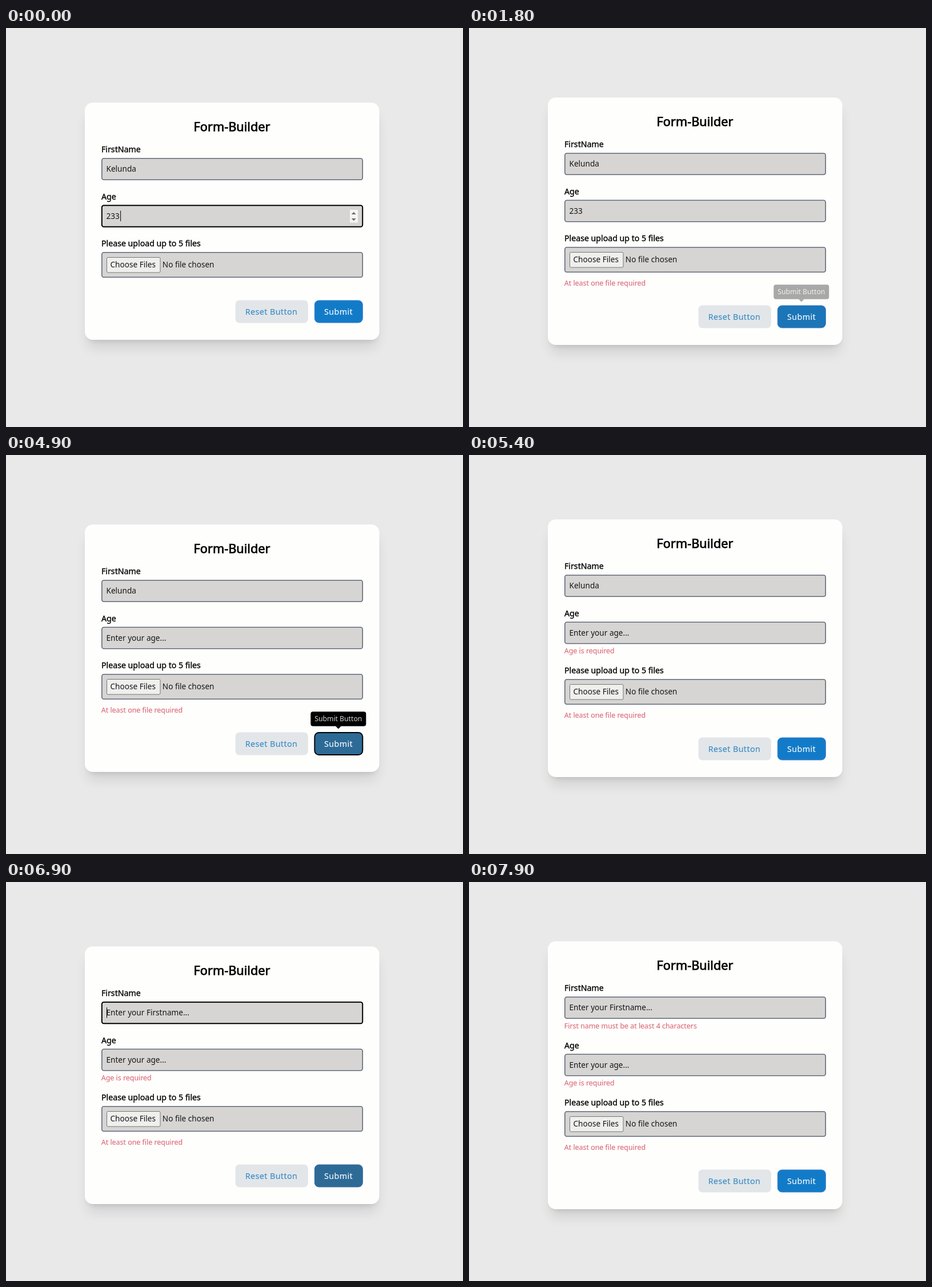
An HTML page for the animation above (8000 ms loop, 800 by 700 pixels).

```html
<!DOCTYPE html>
<html lang="en">
<head>
<meta charset="utf-8">
<title>Form-Builder</title>
<style>
  html, body { margin: 0; width: 100%; height: 100%; overflow: hidden; background: #e9e9e9; }
  svg { display: block; width: 800px; height: 700px; font-family: "Noto Sans", "Open Sans", sans-serif; }
  text { font-size: 13.6px; fill: #161616; white-space: pre; }
  .title { font-size: 21.7px; fill: #000; stroke: #000; stroke-width: .75; text-anchor: middle; }
  .label { font-size: 14.17px; fill: #000; stroke: #000; stroke-width: .35; }
  .error { font-size: 12.4px; fill: #dc6d7b; stroke: #dc6d7b; stroke-width: .15; }
  .btn { font-size: 14.3px; letter-spacing: .4px; stroke-width: .2; }
  .tip text { font-size: 12.2px; fill: #d4d4d4; text-anchor: middle; }
  .field { fill: #d6d5d3; }
</style>
</head>
<body>
<svg id="stage" viewBox="0 0 800 700"></svg>
<script>
const LOOP = 8000, STEP = 100, ERROR_H = 18;
const NAME = 'Kelunda';
const stage = document.getElementById('stage');

function el(parent, tag, attrs = {}, content = '') {
  const node = document.createElementNS('http://www.w3.org/2000/svg', tag);
  set(node, attrs);
  node.textContent = content;
  return parent.appendChild(node);
}
function set(node, attrs) {
  for (const key in attrs) node.setAttribute(key, attrs[key]);
}
const rect = (parent, x, y, width, height, rx, attrs) =>
  el(parent, 'rect', { x, y, width, height, rx, ...attrs });
const text = (parent, x, y, cls, content) =>
  el(parent, 'text', { x, y, class: cls }, content);
const show = (node, on) => set(node, { visibility: on ? 'visible' : 'hidden' });
const between = (t, a, b) => t >= a && t < b;
const ramp = (t, a, b) => Math.min(1, Math.max(0, (t - a) / (b - a)));
const mix = (a, b, k) => `rgb(${a.map((v, i) => Math.round(v + (b[i] - v) * k))})`;

// Everything is placed relative to the top edge of the card.
const card = el(stage, 'g');
const shadowFar = rect(card, 142.5, 22.5, 507, 0, 10, { fill: '#000', opacity: .1, style: 'filter:blur(11px)' });
const shadowNear = rect(card, 143.5, 12, 505, 0, 10, { fill: '#000', opacity: .1, style: 'filter:blur(4.5px)' });
const panel = rect(card, 138, 0, 515.5, 0, 14, { fill: '#fefefd' });
text(card, 395.5, 50.3, 'title', 'Form-Builder');

function makeField(label, y, height, error, errorY) {
  const g = el(card, 'g');
  text(g, 167, y - 10, 'label', label);
  const box = rect(g, 167.8, y + .8, 456.4, height - 1.6, 3.5, { class: 'field' });
  const err = text(g, 166.8, y + errorY, 'error', error);
  return { g, box, err, y };
}

function makeInput(label, y, error) {
  const field = makeField(label, y, 39, error, 55.5);
  field.value = text(field.g, 175.5, y + 24.3, '', '');
  field.caret = rect(field.g, 0, y + 10, 1, 18.5, 0, { fill: '#000' });
  return field;
}

const first = makeInput('FirstName', 97, 'First name must be at least 4 characters');
const age = makeInput('Age', 179.5, 'Age is required');
const files = makeField('Please upload up to 5 files', 262, 45, 'At least one file required', 68);

const spinner = el(age.g, 'g');
rect(spinner, 602, 188, 14, 22.5, 0, { fill: '#f5f5f4' });
el(spinner, 'path', { d: 'M604.7 196h8l-4-4.3z M604.7 203h8l-4 4.3z', fill: '#6e6e6e' });

set(files.box, { stroke: '#626b79', 'stroke-width': 1.6 });
rect(files.g, 176.5, 271.5, 93.5, 26.5, 2, { fill: '#efefee', stroke: '#767676' });
text(files.g, 182.5, 289, '', 'Choose Files');
text(files.g, 273.8, 289, '', 'No file chosen');

const buttons = el(card, 'g');
rect(buttons, 401.5, 346.5, 127.3, 40, 7, { fill: '#e3e6e9' });
set(text(buttons, 418.8, 371.6, 'btn', 'Reset Button'), { fill: '#428fc6', style: 'fill:#428fc6;stroke:#428fc6' });
const submit = rect(buttons, 540.3, 347, 84, 39, 7.5);
set(text(buttons, 557, 371.6, 'btn', 'Submit'), { style: 'fill:#eef5fb;stroke:#eef5fb' });

function makeTip(cx, width, label) {
  const g = el(buttons, 'g', { class: 'tip' });
  rect(g, cx - width / 2, 310.3, width, 25.5, 4, { fill: '#000' });
  el(g, 'path', { d: `M${cx - 5} 335.5h10l-5 5z`, fill: '#000' });
  text(g, cx, 327, '', label);
  return g;
}
const resetTip = makeTip(465, 88, 'Reset Button');
const submitTip = makeTip(581.8, 97, 'Submit Button');

// One visit to the submit button: hover, tooltip, press, validation, leave.
const visits = [
  { hover: [1100, 1300], tip: [1100, 1400], press: 1300, done: 1500, leave: [1600, 1900] },
  { hover: [4100, 4400], tip: [4300, 4600], press: 4900, done: 5100, leave: [5100, 5400] },
  { hover: [6600, 6900], tip: [6900, 7100], press: 7200, done: 7400, leave: [7600, 7900] }
];

function drawInput(field, value, placeholder, focus, caretOn, caretAtStart) {
  field.value.textContent = value;
  const width = value && !caretAtStart ? field.value.getComputedTextLength() : 0;
  set(field.caret, { x: 176 + width + (width ? .8 : 0) });
  show(field.caret, focus && caretOn);
  if (!value) field.value.textContent = placeholder;
  set(field.box, { stroke: focus ? '#000' : '#626b79', 'stroke-width': focus ? 2 : 1.6 });
}

function ageValue(t) {
  if (t < 3700) return '233';
  if (t < 4200) return '23';
  return t < 4300 ? '2' : '';
}

function draw(now) {
  const t = Math.floor((now % LOOP) / STEP) * STEP;
  const [fileErr, ageErr, firstErr] = visits.map(v => t >= v.done ? 1 : 0);
  const count = fileErr + ageErr + firstErr;
  const height = 416 + ERROR_H * count;

  set(card, { transform: `translate(0 ${131 - ERROR_H / 2 * count})` });
  set(panel, { height });
  set(shadowFar, { height: height - 9 });
  set(shadowNear, { height: height - 10 });
  set(age.g, { transform: `translate(0 ${ERROR_H * firstErr})` });
  set(files.g, { transform: `translate(0 ${ERROR_H * (firstErr + ageErr)})` });
  set(buttons, { transform: `translate(0 ${ERROR_H * count})` });
  show(first.err, firstErr);
  show(age.err, ageErr);
  show(files.err, fileErr);

  const ageFocus = t < 1300 || between(t, 2800, 4900);
  const ageCaret = t < 200 || between(t, 700, 1200) || between(t, 2800, 3900) || t >= 4200;
  drawInput(age, ageValue(t), 'Enter your age...', ageFocus, ageCaret, between(t, 2800, 3200));
  show(spinner, ageFocus || between(t, 2500, 2800) || t === 5700);

  const erased = Math.max(0, Math.floor((t - 5800) / 100));
  const name = NAME.slice(0, Math.max(0, NAME.length - erased));
  drawInput(first, name, 'Enter your Firstname...', between(t, 5800, 7200), t < 7000);

  let hover = 0, tip = 0, pressed = false;
  for (const v of visits) {
    const stay = 1 - ramp(t, ...v.leave);
    hover = Math.max(hover, ramp(t, ...v.hover) * stay);
    tip = Math.max(tip, ramp(t, ...v.tip) * stay);
    pressed = pressed || between(t, v.press, v.done);
  }
  set(submit, {
    fill: mix([18, 123, 200], [45, 106, 150], hover),
    stroke: pressed ? '#000' : mix([58, 126, 206], [52, 108, 158], hover),
    'stroke-width': pressed ? 1.9 : 1
  });
  set(submitTip, { opacity: tip });
  set(resetTip, { opacity: between(t, 900, 1200) ? .3 : 0 });
}

function tick() {
  draw(performance.now());
  requestAnimationFrame(tick);
}
tick();
</script>
</body>
</html>
```
